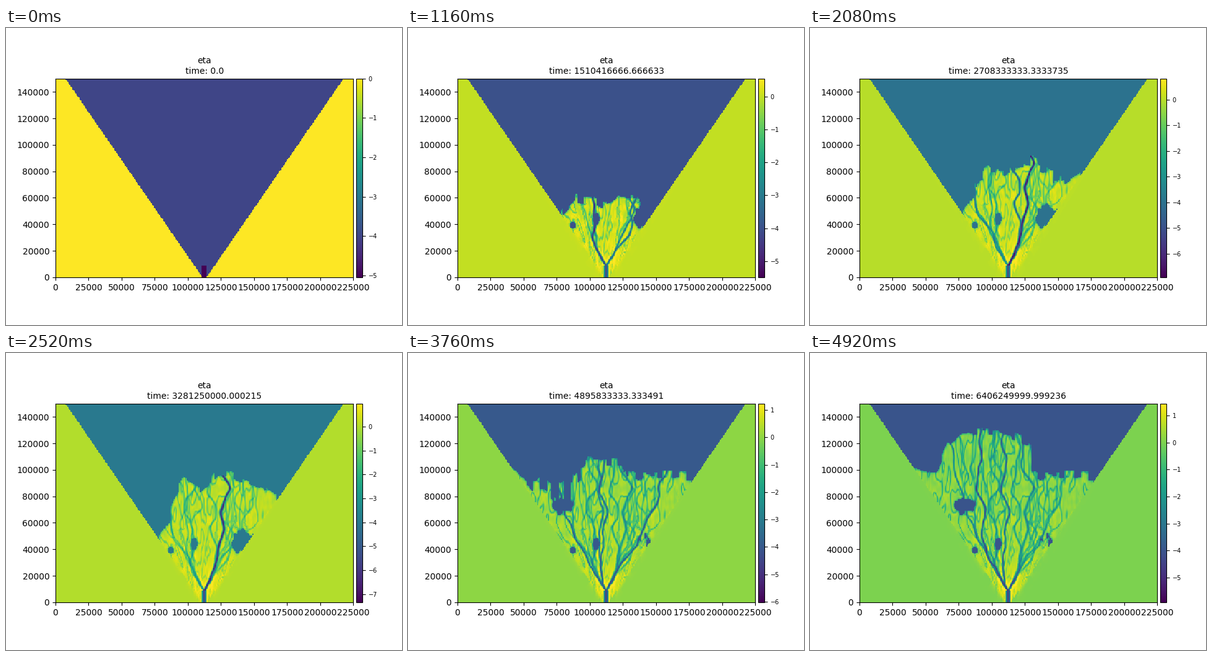
A matplotlib script for the animation above (4.96 s loop, 640 by 480 pixels).

```python
import numpy as np
import matplotlib.pyplot as plt
from matplotlib.animation import FuncAnimation
from mpl_toolkits.axes_grid1 import make_axes_locatable

FRAMES, INTERVAL = 124, 40
NX, NY = 300, 200
BASE_Y, INLET_X, WEDGE_X = 403, 319.9, 320.45
OCEAN = -4.0

plt.rcParams["font.family"] = "DejaVu Sans"
rng = np.random.default_rng(12)

# Shapes are laid out in stage pixels, y pointing down.
CELL = 481.37 / NX
cols = 80 + CELL * (np.arange(NX) + 0.5)
rise = CELL * (np.arange(NY) + 0.5)
X, height = np.meshgrid(cols, rise)
Y = BASE_Y - height
wall = np.abs(X - WEDGE_X) - (3.3 + 0.6885 * height)
land = wall > 0
wall_y = BASE_Y - np.maximum(np.abs(cols - WEDGE_X) - 3.3, 0) / 0.6885
inlet = (np.abs(X - INLET_X) < 4.1) & (height < 19.3)

# Model clock: one hundred summed time steps per frame.
clock = np.concatenate([[0.0], np.cumsum(np.full(100 * FRAMES, 1562500 / 3))])[::100]

# Colour range at a few key times.
KEY_T = [0, 29, 39, 63, 81, 108, 123]
LOW = [-5.05, -5.49, -6.42, -7.34, -5.37, -6.73, -5.92]
HIGH = [0, 0.545, 0.66, 0.956, 1.16, 1.3, 1.44]


def noise(sx, sy):
    """Smooth random field with unit spread."""
    white = rng.normal(size=(NY, NX))
    fx = np.fft.rfftfreq(NX)
    fy = np.fft.fftfreq(NY)[:, None]
    kernel = np.exp(-2 * np.pi**2 * ((sx * fx) ** 2 + (sy * fy) ** 2))
    field = np.fft.irfft2(np.fft.rfft2(white) * kernel, s=white.shape)
    return field / field.std()


def blur(a):
    for axis in (0, 1, 0, 1):
        a = (np.roll(a, 1, axis) + a + np.roll(a, -1, axis)) / 3
    return a


def ramp(t, start, length):
    return np.clip((t - start) / length, 0, 1)


def bump(distance, width):
    return np.exp(-((distance / width) ** 2))


# ---- texture: thin old channels along the zero lines of a noise field,
# squeezed together towards the apex
squeeze = 0.35 + 0.65 * np.clip(height / 130, 0, 1)
source = (NX / 2 + (X - INLET_X) / CELL / squeeze).astype(int) % NX
field = noise(1.5, 6)[np.arange(NY)[:, None], source]
gap = np.abs(field) / (np.hypot(*np.gradient(field)) + 0.12)
rough, wobble = noise(1.2, 2.5), noise(3, 3)
near = np.exp(-np.hypot(X - INLET_X, height) / 95)
texture = ((1 - 0.6 * near) * (0.2 * bump(gap - 1.7, 0.7) - 1.5 * bump(gap, 0.6))
           + 0.12 * rough - 0.05)
spill = np.exp(-np.maximum(wall, 0) / 3 - height / 55) * (rough > -0.5)

# ---- delta front: outline at the end of each stage, broken into fingers
STAGES = [
    (0, 29, [(247, 300), (268, 276), (300, 278), (318, 287), (340, 272), (372, 276),
             (378, 296)]),
    (29, 39, [(250, 288), (270, 258), (300, 256), (340, 240), (365, 256), (405, 274)]),
    (39, 63, [(266, 240), (285, 205), (315, 222), (342, 192), (410, 214), (437, 232)]),
    (63, 81, [(279, 200), (290, 172), (345, 174), (360, 216), (380, 194), (457, 198)]),
    (81, 108, [(165, 182), (205, 188), (222, 152), (265, 172), (315, 166)]),
    (108, 123, [(214, 154), (245, 130), (300, 124), (357, 146)]),
]


def grow_stage(start, stop, outline):
    widths = rng.integers(3, 8, 100)
    offset, delay = np.repeat(rng.uniform(size=(2, 100)), widths, axis=1)[:, :NX]
    px, py = zip(*outline)
    top = np.interp(cols, px, py, left=BASE_Y, right=BASE_Y) + 16 * (offset - 0.5)
    span = stop - start
    return start + 0.3 * span * delay, 0.7 * span, np.minimum(top, BASE_Y)


first, *growth = [grow_stage(*stage) for stage in STAGES]


def front(t):
    scale = np.sqrt(np.clip(t / 29, 0.002, 1))
    top = np.interp(INLET_X + (cols - INLET_X) / scale, cols, first[2])
    top = np.minimum(BASE_Y - scale * (BASE_Y - top), wall_y)
    for start, length, target in growth:
        top = top - ramp(t, start, length) * np.maximum(top - target, 0)
    return top


# ---- bays left open inside the delta: x, y, radii, time of filling
BAYS = [(304, 308, 5, 10, 200), (266, 319, 5, 5, 200), (383, 304, 18, 18, 64),
        (249, 247, 17, 12, 200)]
bays = [(((X - x) / rx) ** 2 + ((Y - y) / ry) ** 2 + 0.25 * rough, fill)
        for x, y, rx, ry, fill in BAYS]


# ---- channels: they leave the apex sideways, then bend upright at an offset
def make_channel(start, stop, depth, offset):
    up = np.maximum(rise - 19, 0)
    path = INLET_X + offset * np.tanh(0.64 * up / abs(offset))
    path += 4 * np.clip(up / 50, 0, 1) * noise(1, 7)[:, 0]
    slant = np.hypot(1, np.gradient(path, rise))
    distance = np.abs(X + 0.8 * wobble - path[:, None]) / slant[:, None]
    width = 0.9 + 0.12 * depth
    return start, stop, depth, bump(distance, width), bump(distance - 2.2 * width, 2)


MAIN = [(0, 34, 4.8, -24), (0, 42, 3.3, 44), (30, 56, 2.8, -25), (33, 50, 5.4, 13),
        (50, 68, 6.6, 29), (68, 101, 4.2, 120), (70, 104, 3.6, -8), (82, 118, 4.1, -105),
        (88, 200, 4, -6), (110, 200, 4.5, -44)]
side = [(8 + 6 * k, 10 + 6 * k, 4, offset)
        for k, offset in enumerate((-34, 36, -18, 58, 80, 100, -60, -82))]
channels = [make_channel(*spec) for spec in side + MAIN]


def bed_level(t):
    if t == 0:
        return np.where(inlet, LOW[0], np.where(land, 0, OCEAN))
    high = np.interp(t, KEY_T, HIGH)
    low = np.interp(t, KEY_T, LOW)
    delta = ~land & (Y > front(t))
    for shape, fill in bays:
        delta &= shape > 1 - ramp(t, fill, 5)
    soft = blur((delta | land).astype(float))

    bed = texture + 0.9 * high * near - 2.8 * (1 - soft)
    for start, stop, depth, core, levee in channels:
        power = ramp(t, start - 2, 4) * (1 - 0.62 * ramp(t, stop, 12))
        if power > 0:
            bed = bed + 0.3 * high * power * levee * (0.35 + near)
            bed = bed + power * core * (-depth - bed)

    eta = np.where(delta, np.clip(bed, low, high), OCEAN)
    eta = np.where(land, 0.85 * high * spill * ramp(t, 0, 20), eta)
    mouth = -1.2 + (0.75 * low + 1.2) * bump(X - INLET_X, 2.8)
    return np.where(inlet, LOW[0] + ramp(t, 0, 10) * (mouth - LOW[0]), eta)


# ---- figure
fig, ax = plt.subplots(figsize=(6.4, 4.8), dpi=100)
image = ax.imshow(bed_level(0), cmap="viridis", origin="lower", interpolation="nearest",
                  extent=(0, 225000, 0, 150000), vmin=LOW[0], vmax=0)
ax.set_xticks(range(0, 225001, 25000))
ax.set_yticks(range(0, 140001, 20000))
cax = make_axes_locatable(ax).append_axes("right", size="2%", pad=0.05)
bar = fig.colorbar(image, cax=cax)
bar.ax.tick_params(labelsize=7)
title = ax.set_title("", fontsize=10)


def update(t):
    low, high = np.interp(t, KEY_T, LOW), np.interp(t, KEY_T, HIGH)
    image.set_data(bed_level(t))
    image.set_clim(low, high)
    bar.set_ticks(np.arange(np.ceil(low), np.floor(high) + 1))
    title.set_text(f"eta\ntime: {float(clock[t])}")
    return image, title


anim = FuncAnimation(fig, update, frames=FRAMES, interval=INTERVAL, repeat=True)
plt.show()
```
